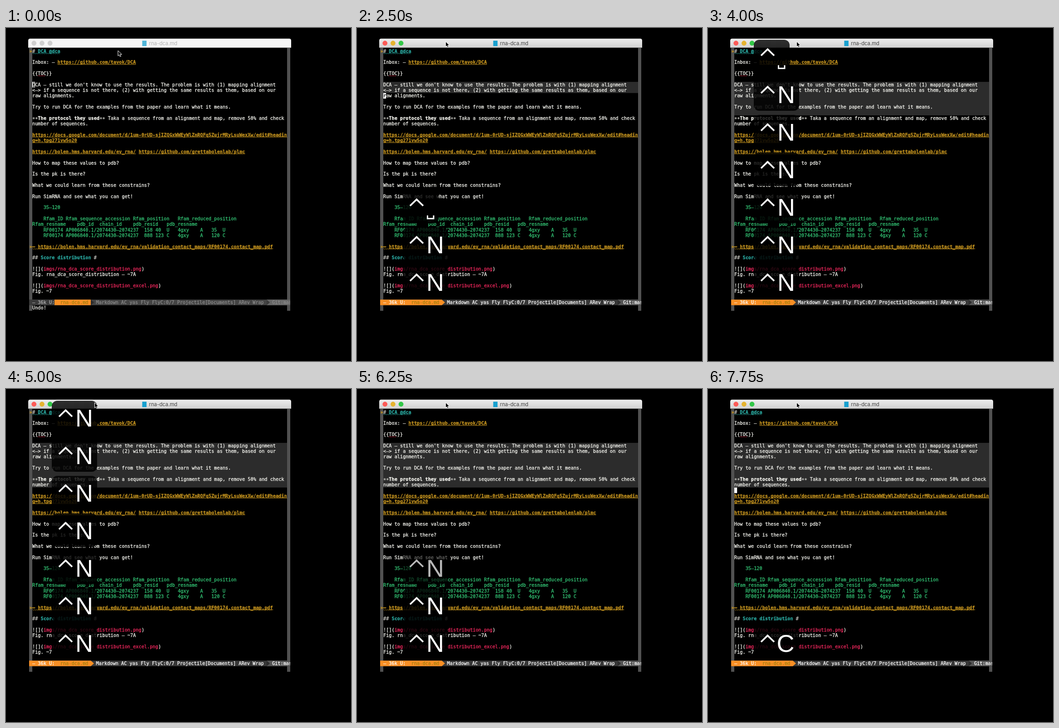
Animation, 761 px wide and 736 px high, one loop 8 s. Source, as an HTML page:

```html
<!DOCTYPE html>
<html lang="en">
<head>
<meta charset="utf-8">
<title>Editor with key overlay</title>
<style>
html, body { margin: 0; width: 100%; height: 100%; overflow: hidden; background: #000; }
svg { display: block; width: 100%; height: 100%; }
text { white-space: pre; fill: currentColor; }
.mono { font: 10.26px "DejaVu Sans Mono", "Liberation Mono", monospace; }
.mono text, text.mono { stroke: currentColor; stroke-width: .3; }
.title { font: 11.3px Inter, Roboto, sans-serif; }
.key { font: 54px "Liberation Sans", sans-serif; color: #fff; }
.w { color: #f8f8f2; }
.b { color: #f8f8f2; font-weight: bold; }
.i { color: #f8f8f2; font-style: italic; }
.d { color: #c4c4be; }
.s { color: #c4c4be; transform: translateY(1.8px); }
.h { color: #2aa89f; font-weight: bold; }
.l { color: #c0901e; font-weight: bold; }
.g { color: #34c877; }
.p { color: #f5285f; }
</style>
</head>
<body>
<svg viewBox="0 0 761 736" xml:space="preserve" xmlns="http://www.w3.org/2000/svg">
  <defs>
    <linearGradient id="bar" x2="0" y2="1">
      <stop stop-color="#ededed"/><stop offset="1" stop-color="#d1d1d1"/>
    </linearGradient>
    <linearGradient id="shade" x2="0" y2="1">
      <stop stop-opacity=".8"/><stop offset="1" stop-opacity=".88"/>
    </linearGradient>
    <clipPath id="frame"><rect x="51" y="44" width="576" height="581"/></clipPath>
  </defs>
  <rect width="761" height="736"/>
  <g id="titlebar"></g>
  <g clip-path="url(#frame)">
    <rect x="51" y="44" width="7" height="581" fill="#515151"/>
    <rect x="620" y="44" width="7" height="581" fill="#515151"/>
    <rect id="region" x="58" width="562" fill="#2c2c2c"/>
    <g id="page" class="mono"></g>
    <g id="caret" class="mono"></g>
    <g id="mode" class="mono"></g>
    <text id="echo" class="mono w" x="58" y="622.2">Undo!</text>
  </g>
  <g id="keys"></g>
  <path id="mouse" d="M0 0V11.6L2.7 9.2 4.5 13.4 6.5 12.5 4.8 8.4H8.4Z" fill="#000" stroke="#fff"/>
</svg>
<script>
const LOOP = 8000, STEP = 250;
const LEFT = 58, TOP = 45, CW = 6.177, LH = 12.34;
const ROW_GAP = 83, ROW_BASE = 562, FADE = 208;

const $ = id => document.getElementById(id);
const colX = col => LEFT + col * CW;
const lineY = line => TOP + line * LH;
const esc = s => s.replace(/&/g, "&amp;").replace(/</g, "&lt;");
const text = (x, y, cls, s, color) =>
  `<text x="${x}" y="${y}" class="${cls}" ${color ? `style="color:${color}"` : ""}>${esc(s)}</text>`;
const rect = (x, y, w, h, fill, extra = "") =>
  `<rect x="${x}" y="${y}" width="${w}" height="${h}" fill="${fill}" ${extra}/>`;

// Each line: number, then pairs of style and text.
const LINES = [
  [0, "d", "# ", "h", "DCA @dca"],
  [2, "w", "Inbox: – ", "l", "https://github.com/tavok/DCA"],
  [4, "w", "{{TOC}}"],
  [6, "w", "DCA – still we don't know to use the results. The problem is with (1) mapping alignment"],
  [7, "w", "<–> if a sequence is not there, (2) with getting the same results as them, based on our"],
  [8, "w", "raw alignments."],
  [10, "w", "Try to run DCA for the examples from the paper and learn what it means."],
  [12, "s", "**", "b", "The protocol they used", "s", "**",
    "w", " Taka a sequence from an alignment and map, remove 50% and check"],
  [13, "w", "number of sequences."],
  [15, "l", "https://docs.google.com/document/d/1um-0rUD-sjIZQGxWWEyWlZnRQFq5ZujrMRyLsuWexXw/edit#headin"],
  [16, "l", "g=h.tpg271vw5o20"],
  [18, "l", "https://bolen.hms.harvard.edu/ev_rna/", "w", " ", "l", "https://github.com/grettabolenlab/plmc"],
  [20, "w", "How to map these values to pdb?"],
  [22, "w", "Is the pk is there?"],
  [24, "w", "What we could learn from these constrains?"],
  [26, "w", "Run SimRNA and see what you can get!"],
  [28, "g", "    35–120"],
  [30, "g", "    Rfam_ID Rfam_sequence_accession Rfam_position   Rfam_reduced_position"],
  [31, "g", "Rfam_resname    pdb_id  chain_id    pdb_resid   pdb_resname"],
  [32, "g", "    RF00174 AP006840.1/2074430–2074237  158 40  U   4gxy    A   35  U"],
  [33, "g", "    RF00174 AP006840.1/2074430–2074237  888 123 C   4gxy    A   120 C"],
  [35, "l", "– ", "l", "https://bolen.hms.harvard.edu/ev_rna/validation_contact_maps/RF00174.contact_map.pdf"],
  [37, "d", "## ", "h", "Score distribution", "d", " #"],
  [39, "w", "![](", "p", "imgs/rna_dca_score_distribution.png", "w", ")"],
  [40, "w", "Fig. rna_", "i", "dca", "w", "_score_distribution – ~7A"],
  [42, "w", "![](", "p", "imgs/rna_dca_score_distribution_excel.png", "w", ")"],
  [43, "w", "Fig. ~7"],
];

function wave(line, col, len, color) {
  const n = Math.floor(len * CW / 4);
  return `<path d="M${colX(col)} ${lineY(line) + 11.4}${"q1-2 2 0t2 0".repeat(n)}" fill="none" stroke="${color}" stroke-width=".9"/>`;
}

function drawPage() {
  let out = "";
  for (const [line, ...runs] of LINES) {
    let col = 0;
    for (let i = 0; i < runs.length; i += 2) {
      const [cls, s] = [runs[i], runs[i + 1]];
      out += text(colX(col), lineY(line) + 9.7, cls, s);
      if (cls === "l" && s.length > 2)
        out += rect(colX(col), lineY(line) + 10.5, s.length * CW, 1, "#c0901e");
      col += s.length;
    }
  }
  out += wave(0, 0, 10, "#2aa89f") + wave(4, 2, 3, "#d8203c") + wave(35, 0, 86, "#c0901e");
  for (const line of [0, 35]) out += text(51.5, lineY(line) + 9.7, "l", "»");
  $("page").innerHTML = out;
}

function drawTitle(active) {
  const lights = active ? ["#fc5b57", "#e5b32f", "#33c748"] : Array(3).fill("#d0d0d0");
  $("titlebar").innerHTML =
    `<path d="M49 43.5V28Q49 23.6 53.5 23.6H624.5Q629 23.6 629 28V43.5Z" fill="${active ? "url(#bar)" : "#f6f6f6"}"/>` +
    lights.map((c, i) => `<circle cx="${61.7 + i * 17.7}" cy="33.5" r="5.4" fill="${c}"/>`).join("") +
    rect(300.5, 28, 9.5, 12, "#18a0cf", `opacity="${active ? 1 : .75}"`) +
    text(315.5, 37.8, "title", "rna-dca.md", active ? "#444" : "#b2b2b2");
}

function drawMode(active) {
  const y = lineY(45), base = y + 9.7, mid = y + LH / 2, end = y + LH;
  const tip = (x, fill) => `<path d="M${x} ${y}L${x + 7} ${mid} ${x} ${end}Z" fill="${fill}"/>`;
  const [bg, side, ink] = active ? ["#383838", "#555", "#fff"] : ["#444", "#666", "#8a8a8a"];
  const from = active ? 51 : 107;
  $("mode").innerHTML =
    rect(51, y, 576, LH, bg) +
    (active ? "" : rect(51, y, 56, LH, "#3a3a3a")) +
    rect(575, y, 52, LH, side) + tip(575, active ? "#2c2c2c" : "#3a3a3a") +
    rect(from, y, 187 - from, LH, "#f88f25") + tip(187, active ? "#f88f25" : "#2c2c2c") +
    text(LEFT, base, "", "– 36k U:", active ? "#fff" : "#b4b4b4") +
    text(colX(10), base, "", "rna-dca.md", "#a5800f") +
    text(198.5, base, "", "Markdown AC yas Fly FlyC:0/7 Projectile[Documents] ARev Wrap", ink) +
    text(587, base, "", "Git:mas", ink);
}

// Pressed keys: label, time shown, time gone.
const KEYS = [
  ["␣", 2000, 4950],
  ["N", 2250, 5100], ["N", 2500, 5250], ["N", 2750, 5500], ["N", 2750, 5600],
  ["N", 3250, 5990], ["N", 3500, 6400], ["N", 4250, 6800], ["N", 4500, 7240],
  ["C", 7750, 10500],
];
const BLINKS = [[1250, 1750], [4000, 4250], [5000, 5500], [6000, 6500], [7000, 7500]];

function keyBox(label, y, alpha) {
  const wide = label !== "␣";
  const glyph = wide
    ? text(label === "C" ? 151.5 : 153, 18.7, "key", label)
    : `<path d="M155.5 18.3V25.3H169V18.3" fill="none" stroke="#fff" stroke-width="3"/>`;
  return `<g transform="translate(0 ${y})" opacity="${alpha}">` +
    rect(101, -38, wide ? 100 : 79, 74, "url(#shade)", `rx="12"`) +
    `<path d="M117 -3L131.5 -17 146 -3" fill="none" stroke="#fff" stroke-width="3.8"/>${glyph}</g>`;
}

function drawKeys(t) {
  const shown = KEYS.filter(k => t >= k[1]);
  $("keys").innerHTML = shown.map(([label, , gone], i) => {
    const alpha = Math.max(0, Math.min(1, (gone - t) / FADE));
    return alpha ? keyBox(label, ROW_BASE - (shown.length - 1 - i) * ROW_GAP, alpha) : "";
  }).join("");
}

function drawCaret(t, line, active) {
  const y = lineY(line);
  const hidden = BLINKS.some(([a, b]) => t >= a && t < b);
  if (!active) {
    $("caret").innerHTML = rect(LEFT + .5, y + .5, CW - 1, LH - 1, "none", `stroke="#fff"`);
    return;
  }
  const under = LINES.find(l => l[0] === line);
  $("caret").innerHTML = hidden ? "" : rect(LEFT, y, CW, LH, "#fff") +
    (under ? text(LEFT, y + 9.7, "", under[2][0], "#000") : "");
}

const MOUSE = [[247, 50], [224, 41], [195.5, 30]];

function draw(t) {
  const active = t >= 750;
  const moves = KEYS.filter(k => k[0] === "N" && t >= k[1]).length;
  drawTitle(active);
  drawMode(active);
  drawCaret(t, 6 + moves, active);
  $("region").setAttribute("y", lineY(6));
  $("region").setAttribute("height", moves * LH);
  $("echo").style.display = t < 2000 ? "" : "none";
  drawKeys(t);
  const [x, y] = MOUSE[Math.min(t / STEP, MOUSE.length - 1)];
  $("mouse").setAttribute("transform", `translate(${x} ${y})`);
}

const start = performance.now();
let last = -1;
function tick() {
  // The screen is refreshed in quarter-second steps.
  const t = Math.floor((performance.now() - start) % LOOP / STEP) * STEP;
  if (t !== last) draw(last = t);
  requestAnimationFrame(tick);
}
drawPage();
tick();
</script>
</body>
</html>
```
